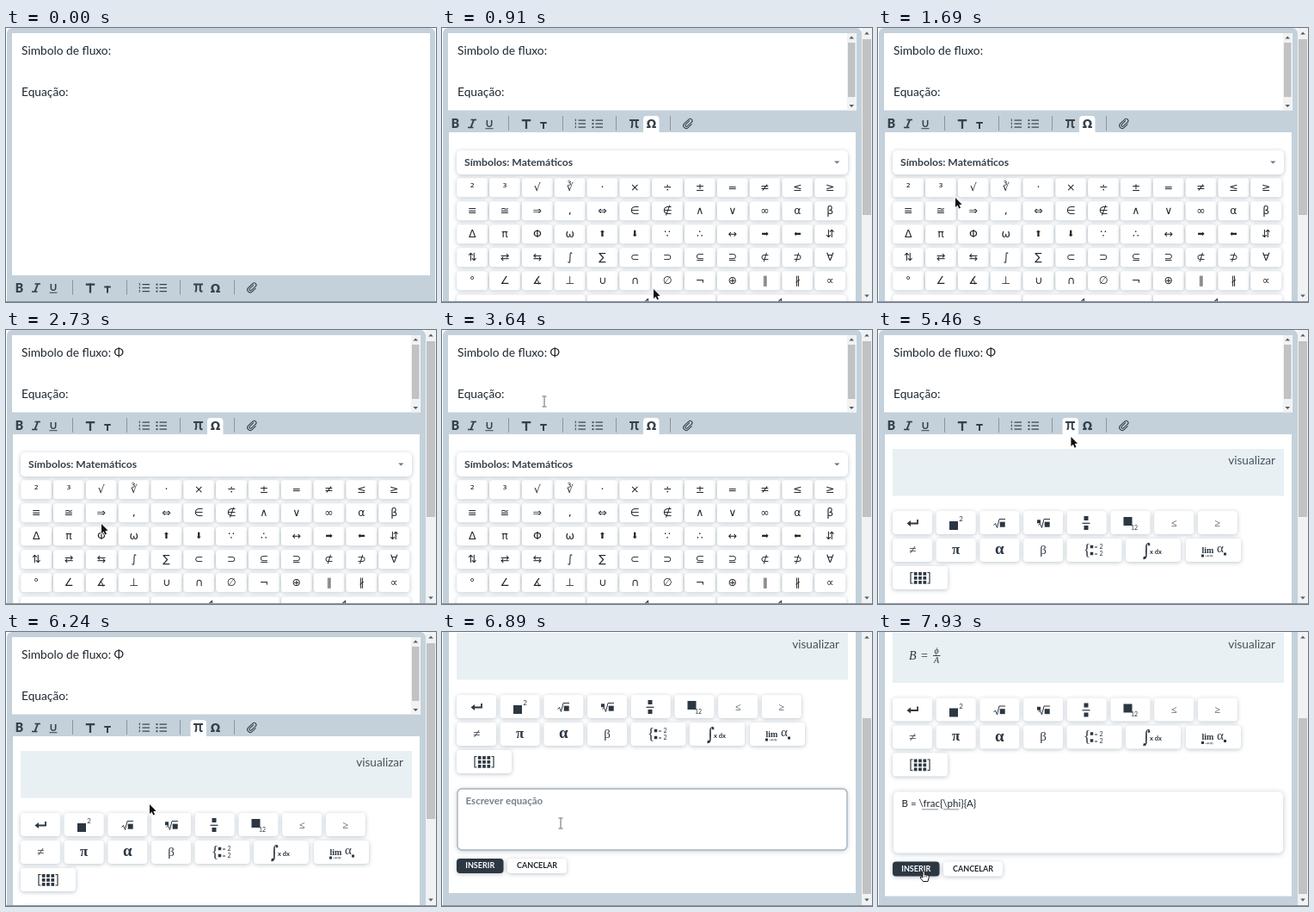
Write an HTML page with a canvas that moves like this. It is 500 px wide and 318 px high and loops after 8 s.

```html
<!DOCTYPE html>
<html lang="pt">
<head>
<meta charset="utf-8">
<title>Editor de equações</title>
<style>
html, body { margin: 0; width: 100%; height: 100%; overflow: hidden; background: #fff; }
canvas { display: block; width: 500px; height: 318px; }
</style>
</head>
<body>
<canvas id="stage"></canvas>
<script>
const W = 500, H = 318, LOOP = 8000, STEP = 130;
const canvas = document.getElementById('stage');
const ctx = canvas.getContext('2d');
const dpr = window.devicePixelRatio || 1;
canvas.width = W * dpr;
canvas.height = H * dpr;

const INK = '#2b343c', ICON = '#36414b', FRAME = '#c4d1db', DARK = '#2d3742';
const SANS = 'Lato, sans-serif';
const SYM = '"DejaVu Sans", sans-serif';
const SERIF = '"Liberation Serif", serif';

const SYMBOLS = [
  '²³√∛·×÷±=≠≤≥',
  '≡≅⇒,⇔∈∉∧∨∞αβ',
  'ΔπΦω⬆⬇∵∴↔➡⬅⇵',
  '⇅⇄⇆∫∑⊂⊃⊆⊇⊄⊅∀',
  '°∠∡⊥∪∩∅¬⊕∥∦∝'
];

// Moments of the interaction, in ms
const OPEN_SYMBOLS = 910, ADD_PHI = 2470, OPEN_EQUATION = 5200;
const SCROLL_FROM = 6370, SCROLL_TO = 6760, PASTE = 7280, BLUR = 7540;
const SCROLL_MAX = 137, GROWTH = 3.5;

// time, x, y, pointer shape from then on
const PATH = [
  [260, 300, 316, 'arrow'], [520, 246, 303, 'hand'], [910, 246, 303, 'arrow'],
  [1170, 246, 303, 'arrow'], [1690, 90, 197, 'arrow'], [2080, 111, 240, 'hand'],
  [2600, 111, 240, 'hand'], [2730, 111, 225, 'arrow'], [3380, 119, 83, 'ibeam'],
  [3900, 119, 83, 'ibeam'], [4550, 231, 113, 'hand'], [5200, 231, 113, 'hand'],
  [5330, 229, 118, 'arrow'], [6110, 167, 200, 'arrow'], [6370, 167, 200, 'arrow'],
  [6630, 138, 222, 'ibeam'], [7280, 138, 222, 'ibeam'], [7410, 120, 235, 'arrow'],
  [7670, 53, 277, 'hand'], [8000, 53, 277, 'hand']
];

const ease = p => p * p * (3 - 2 * p);
const progress = (t, a, b) => ease(Math.min(1, Math.max(0, (t - a) / (b - a))));

function rect(x, y, w, h, color) {
  ctx.fillStyle = color;
  ctx.fillRect(x, y, w, h);
}

function round(x, y, w, h, r, color) {
  ctx.beginPath();
  ctx.roundRect(x, y, w, h, r);
  ctx.fillStyle = color;
  ctx.fill();
}

function card(x, y, w, h, r = 4, color = '#fff', blur = 5) {
  ctx.save();
  ctx.shadowColor = 'rgba(45,75,100,.32)';
  ctx.shadowBlur = blur * dpr;
  ctx.shadowOffsetY = dpr;
  round(x, y, w, h, r, color);
  ctx.restore();
}

function text(str, x, y, font, color = INK, align = 'left', base = 'alphabetic') {
  ctx.font = font;
  ctx.fillStyle = color;
  ctx.textAlign = align;
  ctx.textBaseline = base;
  ctx.fillText(str, x, y);
}

const centered = (str, x, y, font, color) => text(str, x, y, font, color, 'center', 'middle');

function line(points, width = 1, color = ICON) {
  ctx.beginPath();
  points.forEach(([x, y], i) => i ? ctx.lineTo(x, y) : ctx.moveTo(x, y));
  ctx.lineWidth = width;
  ctx.strokeStyle = color;
  ctx.stroke();
}

function poly(points, color = ICON) {
  ctx.beginPath();
  points.forEach(([x, y]) => ctx.lineTo(x, y));
  ctx.closePath();
  ctx.fillStyle = color;
  ctx.fill();
}

function square(cx, cy, s) {
  rect(cx - s / 2, cy - s / 2, s, s, DARK);
}

function triangle(cx, cy, s, dir, color) {
  poly([[cx - s, cy - dir * s / 2], [cx + s, cy - dir * s / 2], [cx, cy + dir * s / 2]], color);
}

function piIcon(x, y, color) {
  line([[x - 5.5, y - 4], [x + 5.5, y - 4]], 2, color);
  line([[x - 2.3, y - 4], [x - 2.3, y + 2], [x - 3.2, y + 5]], 2, color);
  line([[x + 2.3, y - 4], [x + 2.3, y + 3.2], [x + 3.2, y + 4.2], [x + 5, y + 4]], 2, color);
}

function omegaIcon(x, y, color) {
  text('Ω', x, y + 5, 'bold 13.5px ' + SYM, color, 'center');
}

function bigT(x, y, w, h, thick) {
  rect(x - w / 2, y, w, thick, ICON);
  rect(x - thick / 2, y, thick, h, ICON);
}

function clip(x, y) {
  ctx.save();
  ctx.translate(x, y);
  ctx.rotate(-0.75);
  ctx.lineWidth = 1.1;
  ctx.strokeStyle = ICON;
  ctx.beginPath();
  ctx.moveTo(4, -1.2);
  ctx.lineTo(-2.5, -1.2);
  ctx.arc(-2.5, 0.2, 1.4, -Math.PI / 2, Math.PI / 2, true);
  ctx.lineTo(4, 1.6);
  ctx.arc(4, -0.6, 2.4, Math.PI / 2, -Math.PI / 2, true);
  ctx.lineTo(-3, -3);
  ctx.arc(-3, 0.2, 3.2, -Math.PI / 2, Math.PI / 2, true);
  ctx.lineTo(3, 3.4);
  ctx.stroke();
  ctx.restore();
}

function toolbar(y, tab, hover) {
  text('B', 15.5, y + 5, '900 14px ' + SANS, ICON, 'center');
  line([[37, y - 4.5], [33.5, y + 4.5]], 2);
  line([[33.5, y - 4.5], [40, y - 4.5]], 1.6);
  line([[30, y + 4.5], [36.5, y + 4.5]], 1.6);
  text('U', 55, y + 3.5, 'bold 11.5px ' + SANS, ICON, 'center');
  rect(50.5, y + 5.2, 9, 1, ICON);
  for (const x of [77, 140, 202, 265]) rect(x, y - 9, 1, 17, '#8996a1');
  bigT(98, y - 5, 10.5, 11, 2.3);
  bigT(118, y - 2, 7.5, 8, 2);
  for (let i = -1; i < 2; i++) {
    const ly = y + i * 4;
    rect(158.5, ly - 0.5, 8.5, 1.2, ICON);
    rect(154.8, ly - 1.4, 1, 2.6, ICON);
    rect(178.5, ly - 0.5, 8.5, 1.2, ICON);
    rect(174.5, ly - 0.8, 1.9, 1.9, ICON);
  }
  if (tab) round(tab === 'pi' ? 214.5 : 234, y - 9, 18.5, 20, [4, 4, 0, 0], '#fff');
  if (hover) round(hover === 'pi' ? 214.5 : 234, y - 9, 18.5, 18, 5, DARK);
  piIcon(223.5, y, hover === 'pi' ? '#fff' : ICON);
  omegaIcon(243.5, y, hover === 'omega' ? '#fff' : ICON);
  clip(286, y);
}

function tooltip(label, cx, top) {
  card(cx - 40, top, 80, 36, 6, '#fff', 10);
  text(label, cx, top + 22.5, '11.5px ' + SANS, INK, 'center');
}

function editorText(hasPhi) {
  const font = '13.75px ' + SANS;
  text('Simbolo de fluxo:' + (hasPhi ? ' Φ' : ''), 18, 31, font, '#1d262e');
  text('Equação:', 18, 79, font, '#1d262e');
}

function symbolPanel() {
  card(17, 142, 455, 28, 5);
  text('Símbolos: Matemáticos', 26, 160.3, 'bold 12.2px ' + SANS, '#343f49');
  triangle(459.3, 156, 3.2, 1, '#6b7680');
  SYMBOLS.forEach((row, r) => [...row].forEach((ch, c) => {
    const x = 35.2 + c * 37.82, y = 185.2 + r * 27;
    card(x - 18, y - 11, 36, 22);
    const size = '⬆⬇➡⬅'.includes(ch) ? 10 : 12.5;
    centered(ch, x, y + 0.5, size + 'px ' + SYM, '#20272d');
  }));
  for (let i = 0; i < 3; i++) card(17 + i * 151.5, 309.5, 150, 22);
  for (const x of [239, 394]) line([[x - 2.5, 317], [x + 0.5, 314.5], [x + 0.5, 318]], 1.2);
}

function rootIcon(x, y) {
  line([[x - 7, y + 2], [x - 5, y], [x - 3, y + 5], [x - 0.5, y - 5], [x + 6.5, y - 5]], 1, DARK);
  square(x + 3.2, y + 1.2, 6);
}

function equationKeys(top) {
  const y1 = top + 13.5, y2 = top + 45.5, y3 = top + 77.5;
  const col = i => 40 + i * 50.7;
  for (let i = 0; i < 8; i++) card(col(i) - 23, y1 - 13.5, 46, 27);
  for (let i = 0; i < 4; i++) card(col(i) - 23, y2 - 13.5, 46, 27);
  for (const x of [219.5, 288, 358]) card(x, y2 - 13.5, 64, 27);
  card(17, y3 - 13.5, 64, 27);

  line([[46, y1 - 3.5], [46, y1 + 1], [36, y1 + 1]], 1.8, DARK);
  poly([[33.5, y1 + 1], [38, y1 - 2.5], [38, y1 + 4.5]], DARK);
  square(88, y1 + 3.5, 10);
  centered('2', 96.5, y1 - 3.5, '8px ' + SANS, DARK);
  rootIcon(141.5, y1 + 1);
  rootIcon(193.5, y1 + 1);
  square(187, y1 - 1.2, 4);
  square(242, y1 - 5, 5);
  square(242, y1 + 6, 5);
  rect(237.5, y1 + 0.2, 9, 1.2, DARK);
  square(290.5, y1 - 1.5, 10);
  centered('12', 298, y1 + 6, '7px ' + SANS, DARK);
  centered('≤', col(6), y1 + 1, '12px ' + SERIF, DARK);
  centered('≥', col(7), y1 + 1, '12px ' + SERIF, DARK);

  centered('≠', col(0), y2 + 1, '15px ' + SERIF, DARK);
  centered('π', col(1), y2, 'bold 17px ' + SERIF, DARK);
  centered('α', col(2), y2, 'bold 19px ' + SERIF, DARK);
  centered('β', col(3), y2 + 0.5, '15px ' + SERIF, DARK);
  centered('{', 243, y2 + 0.5, '18px ' + SERIF, DARK);
  for (const dy of [-4, 4]) {
    square(248.5, y2 + dy, 3.5);
    centered('= 2', 256.5, y2 + dy + 0.5, '7px ' + SANS, DARK);
  }
  centered('∫', 312, y2, '20px ' + SERIF, DARK);
  square(315, y2 - 6.5, 2.5);
  square(310, y2 + 8.5, 2.5);
  text('x dx', 316, y2 + 4, 'bold 7.5px ' + SANS, DARK);
  text('lim', 383.5, y2 + 3, 'bold 10px ' + SERIF, DARK, 'center');
  square(377.5, y2 + 6.5, 3);
  text('→∞', 380, y2 + 8.5, '6px ' + SYM, DARK);
  text('α', 394, y2 + 2.5, '15px ' + SERIF, DARK);
  square(403.5, y2 + 4.5, 3);

  line([[40.5, y3 - 6], [38, y3 - 6], [38, y3 + 6.5], [40.5, y3 + 6.5]], 1.2, DARK);
  line([[57.5, y3 - 6], [60, y3 - 6], [60, y3 + 6.5], [57.5, y3 + 6.5]], 1.2, DARK);
  for (let i = 0; i < 9; i++) square(43.7 + i % 3 * 5.3, y3 - 4.6 + Math.floor(i / 3) * 5, 3.7);
}

function formula(x, y) {
  const font = size => `italic ${size}px ${SERIF}`;
  text('B', x, y + 4.5, font(14), INK);
  text('=', x + 14, y + 4.5, '14px ' + SERIF, INK);
  centered('ϕ', x + 32, y - 5, font(10), INK);
  rect(x + 28, y, 8.5, 0.9, INK);
  centered('A', x + 32, y + 6, font(10), INK);
}

function equationPanel(t) {
  const filled = t >= PASTE, grow = filled ? GROWTH : 0;
  rect(17, 138, 455, 54.5 + grow, '#e8f0f4');
  text('visualizar', 462, 155.5, '13.6px ' + SANS, '#46525c', 'right');
  if (filled) formula(36, 164);
  equationKeys(210 + grow);

  const top = 319 + grow;
  card(18, top, 453, 71, 5, '#fff', 6);
  if (t < BLUR) {
    ctx.beginPath();
    ctx.roundRect(18, top, 453, 71, 5);
    ctx.lineWidth = 1.4;
    ctx.strokeStyle = '#a7b4be';
    ctx.stroke();
  }
  if (filled) {
    text('B = \\frac{\\phi}{A}', 27.5, top + 17.5, '11.5px ' + SANS, '#1d262e');
    rect(51, top + 20, 19, 0.8, '#6a737b');
    rect(76, top + 20, 18, 0.8, '#6a737b');
  } else {
    text('Escrever equação', 27.5, top + 17.5, 'bold 11.55px ' + SANS, '#77828b');
  }
  card(17, top + 81, 54.5, 17, 4, DARK);
  card(76, top + 81, 69, 17);
  text('INSERIR', 44.2, top + 92.3, 'bold 9px ' + SANS, '#fff', 'center');
  text('CANCELAR', 110.5, top + 92.3, 'bold 9px ' + SANS, '#20292f', 'center');
}

function scrollbar(x, w, y, h, thumbY, thumbH, arrow) {
  rect(x, y, w, h, '#f1f2f3');
  rect(x + 1, thumbY, w - 2, thumbH, '#c1c2c4');
  triangle(x + w / 2, y + arrow, 2.8, -1, '#555b60');
  triangle(x + w / 2, y + h - arrow, 2.8, 1, '#555b60');
}

function closedEditor(hover) {
  round(1, 0, 498, H + 8, 6, FRAME);
  rect(7, 6, 486, 281, '#fff');
  editorText(false);
  toolbar(301.5, null, hover ? 'omega' : null);
  if (hover) tooltip('Símbolos', 257, 240);
}

function openEditor(t) {
  const scroll = SCROLL_MAX * progress(t, SCROLL_FROM, SCROLL_TO);
  const equation = t >= OPEN_EQUATION;
  const hover = t >= 4550 && t < 5330;
  const bottom = equation ? 440 + (t >= PASTE ? GROWTH : 0) : 480;
  ctx.save();
  ctx.translate(0, -scroll);
  round(1, 0, 487, 500, 6, FRAME);
  rect(7, 6, 475, 89.5, '#fff');
  scrollbar(471, 10.5, 6, 89.5, 17, 63, 5);
  editorText(t >= ADD_PHI);
  rect(8, 121, 473, bottom - 121, '#fff');
  toolbar(111, equation ? 'pi' : 'omega', hover ? 'pi' : null);
  if (equation) equationPanel(t);
  else symbolPanel();
  if (hover) tooltip('Equação', 237, 50);
  ctx.restore();
  scrollbar(488, 12, 0, 317, 13 + scroll * 87 / SCROLL_MAX, 204, 6);
}

function pointerAt(t) {
  const i = PATH.findIndex((k, n) => n + 1 < PATH.length && t >= k[0] && t < PATH[n + 1][0]);
  if (i < 0) return null;
  const [ta, xa, ya, kind] = PATH[i], [tb, xb, yb] = PATH[i + 1];
  const p = progress(t, ta, tb);
  return { x: xa + (xb - xa) * p, y: ya + (yb - ya) * p, kind };
}

const POINTERS = {
  arrow() {
    ctx.beginPath();
    for (const [x, y] of [[0, 0], [0, 11], [2.5, 8.7], [4.3, 12.6], [6, 11.8], [4.3, 8], [7.6, 7.7]]) ctx.lineTo(x, y);
    ctx.closePath();
    ctx.lineWidth = 1.4;
    ctx.strokeStyle = '#fff';
    ctx.stroke();
    ctx.fillStyle = '#111';
    ctx.fill();
  },
  hand() {
    ctx.beginPath();
    ctx.moveTo(-1, 7);
    ctx.lineTo(-1, 1);
    ctx.quadraticCurveTo(0, -1, 1.2, 1);
    ctx.lineTo(1.2, 4.5);
    ctx.lineTo(5, 5.2);
    ctx.quadraticCurveTo(6.5, 5.5, 6.3, 7.5);
    ctx.lineTo(5, 12.5);
    ctx.lineTo(-0.5, 12.5);
    ctx.lineTo(-4, 8);
    ctx.quadraticCurveTo(-3.5, 6, -1, 8);
    ctx.closePath();
    ctx.fillStyle = '#fff';
    ctx.fill();
    ctx.lineWidth = 1;
    ctx.strokeStyle = '#15191c';
    ctx.stroke();
    for (const x of [1.6, 3.6]) line([[x, 5.2], [x, 7.5]], 0.7, '#15191c');
  },
  ibeam() {
    line([[0, -5.5], [0, 5.5]], 1, '#666');
    for (const y of [-6, 6]) line([[-2.5, y], [2.5, y]], 1, '#666');
  }
};

function draw(t) {
  ctx.setTransform(dpr, 0, 0, dpr, 0, 0);
  rect(0, 0, W, H, '#fff');
  if (t < OPEN_SYMBOLS) closedEditor(t >= 520);
  else openEditor(t);
  rect(0, 317, W, 1, '#8b949b');
  const p = pointerAt(t);
  if (p) {
    ctx.translate(p.x, p.y);
    POINTERS[p.kind]();
  }
}

const start = performance.now();
function tick() {
  const t = Math.max(0, performance.now() - start) % LOOP;
  draw(Math.floor(t / STEP) * STEP);
  requestAnimationFrame(tick);
}
tick();
</script>
</body>
</html>
```
